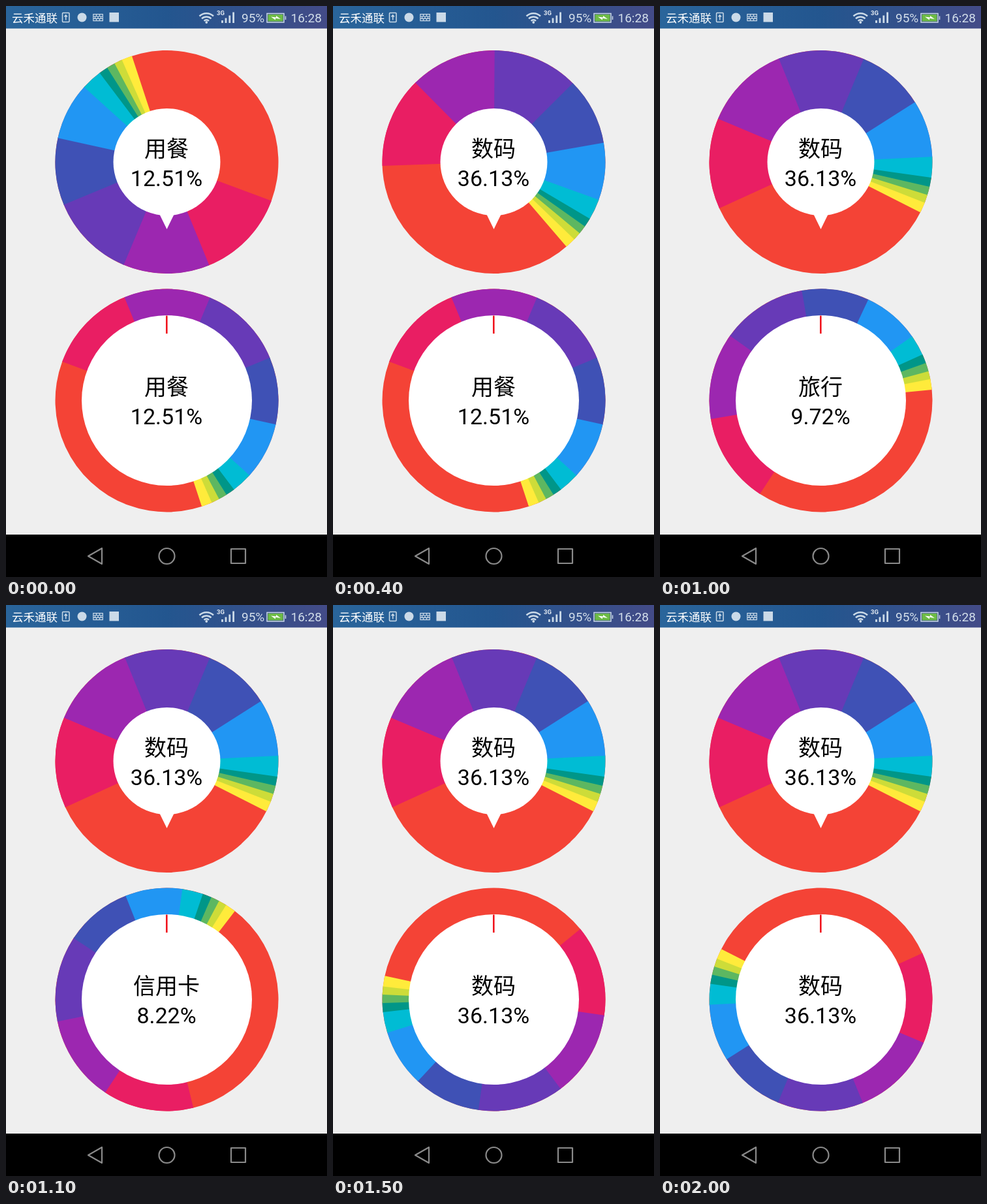
An HTML page for the animation above (2.4 s loop, 492 px wide and 875 px high).

```html
<!DOCTYPE html>
<html lang="zh-CN">
<head>
<meta charset="utf-8">
<title>Pie charts</title>
<style>
  html, body { margin: 0; height: 100%; overflow: hidden; background: #efefef; }
  svg { display: block; width: 100%; height: 100%; }
  text { font-family: Roboto, "Noto Sans CJK SC", "Noto Sans CJK", sans-serif; }
  .label { font-size: 34px; text-anchor: middle; fill: #000; }
  .status { font-size: 19px; fill: #d3dfeb; }
  .line { fill: none; stroke: #cbdae8; stroke-width: 1.5; }
  .nav { fill: none; stroke: #8a8a8a; stroke-width: 2.2; stroke-linejoin: round; }
</style>
</head>
<body>
<svg viewBox="0 0 492 875">
  <defs>
    <linearGradient id="bar">
      <stop offset="0" stop-color="#2a659b"/>
      <stop offset=".5" stop-color="#23568f"/>
      <stop offset="1" stop-color="#434b87"/>
    </linearGradient>
  </defs>
  <rect width="492" height="875" fill="#efefef"/>

  <!-- status bar -->
  <rect width="492" height="34.5" fill="url(#bar)"/>
  <text x="9" y="24.5" font-size="17.5" font-weight="500" fill="#fff">云禾通联</text>
  <g class="line">
    <rect x="86.5" y="10.5" width="10.5" height="14" rx="1"/>
    <path d="M91.7 21.5v-7M89.5 16.5l2.2-2.5 2.2 2.5"/>
    <path d="M133.8 12.7h14.5v10h-14.5zM134 16h14M134 19.3h14M138.5 13v3M143.5 13v3M141 16v3.3M136.5 16v3M145.5 16v3M138.5 19.5v3M143.5 19.5v3" stroke-width="1.2"/>
    <path d="M296.5 15.5a15.5 15.5 0 0 1 21.5 0M300 19.3a10.5 10.5 0 0 1 14.5 0M303.6 22.8a5.5 5.5 0 0 1 7.4 0" stroke-width="2.5"/>
    <path d="M331.5 26v-4M337 26v-7.5M342.8 26v-11.5M348.6 26v-16.5" stroke-width="2.8"/>
    <path d="M400 11.5h26v13.5h-26zM428.5 15.5v5.5"/>
  </g>
  <circle cx="116.5" cy="17.5" r="7" fill="#cbdae8"/>
  <rect x="158.5" y="10" width="14.5" height="14.5" fill="#cbdae8"/>
  <circle cx="307.3" cy="25" r="1.9" fill="#cbdae8"/>
  <rect x="401.5" y="13" width="23" height="10.5" fill="#6dbb45"/>
  <path d="M406 16.5l8 1 0-2.5 7 5-8-1.2v2.7z" fill="#fff"/>
  <text x="323" y="13.5" font-size="9.5" font-weight="700" fill="#e6edf4">3G</text>
  <text class="status" x="361" y="25">95%</text>
  <text class="status" x="436.5" y="25">16:28</text>

  <!-- upper chart -->
  <g id="upperWheel"></g>
  <circle cx="246.5" cy="239" r="82" fill="#fff"/>
  <path d="M235.5 319.5h22L246.5 342z" fill="#fff"/>
  <text class="label" id="upperName" x="246" y="231"></text>
  <text class="label" id="upperShare" x="246" y="276"></text>

  <!-- lower chart -->
  <g id="lowerWheel"></g>
  <circle cx="246.5" cy="604.5" r="130.5" fill="#fff"/>
  <path d="M246.3 474.5v27.5" stroke="#f0141e" stroke-width="2.6"/>
  <text class="label" id="lowerName" x="246" y="596"></text>
  <text class="label" id="lowerShare" x="246" y="641"></text>

  <!-- navigation bar -->
  <rect y="810" width="492" height="65" fill="#000"/>
  <g class="nav">
    <path d="M126 843l21-12v24z"/>
    <circle cx="246.5" cy="843" r="12"/>
    <rect x="345" y="832" width="22" height="22"/>
  </g>
</svg>
<script>
const RADIUS = 171, LOOP = 2400, STEP = 100;
const byId = id => document.getElementById(id);

// Slices clockwise, starting where the largest one ends; sweep in degrees.
const slices = [
  ['购物', '13.14%', 47.3, '#e91e63'],
  ['用餐', '12.51%', 45.1, '#9c27b0'],
  ['交通', '12.42%', 44.7, '#673ab7'],
  ['旅行', '9.72%', 35, '#3f51b5'],
  ['信用卡', '8.22%', 29.7, '#2196f3'],
  ['房租', '3.01%', 10.8, '#00bcd4'],
  ['医疗', '1.30%', 4.7, '#009688'],
  ['娱乐', '1.21%', 4.4, '#5db761'],
  ['学习', '1.17%', 4.2, '#cddc39'],
  ['其他', '1.17%', 5.5, '#ffeb3b'],
  ['数码', '36.13%', 128.6, '#f44336'],
].map(([name, share, sweep, color]) => ({ name, share, sweep, color }));

let total = 0;
for (const slice of slices) {
  slice.start = total;
  slice.end = total += slice.sweep;
}

const rim = degrees => {
  const a = degrees * Math.PI / 180;
  return `${RADIUS * Math.cos(a)} ${RADIUS * Math.sin(a)}`;
};

// The largest slice is a full disc below the others; small overlaps hide seams.
const largest = slices[slices.length - 1];
const wheelMarkup = `<circle r="${RADIUS}" fill="${largest.color}"/>` +
  slices.slice(0, -1).map(({ start, end, color }, i) => {
    const overlap = i < slices.length - 2 ? 0.4 : 0;
    return `<path fill="${color}" d="M0 0L${rim(start)}A${RADIUS} ${RADIUS} 0 0 1 ${rim(end + overlap)}Z"/>`;
  }).join('');

const ease = p => (1 - Math.cos(Math.PI * Math.min(1, p))) / 2;

// A fling slows down to its peak angle, then the wheel snaps to a slice centre.
function spin(k, { peak, peakAt, friction, rest, restAt }) {
  return k < peakAt
    ? peak + friction * (peakAt - k) ** 2
    : peak + (rest - peak) * ease((k - peakAt) / (restAt - peakAt));
}

const upperSpin = { peak: 178.8, peakAt: 4.3, friction: -8.9, rest: 155.5, restAt: 6 };
const lowerSpin = { peak: -53.6, peakAt: 17, friction: 3.606, rest: -24.5, restAt: 20 };

const upperAngle = k => Math.max(20.35, spin(k, upperSpin));
const lowerAngle = k => {
  const dragged = 200.35 - 4.75 * Math.max(0, k - 7);
  return Math.min(dragged, spin(k, lowerSpin));
};

function drawChart(id, centerY, angle, pointer) {
  byId(id + 'Wheel').setAttribute('transform', `translate(246.5 ${centerY}) rotate(${angle})`);
  const under = ((pointer - angle) % 360 + 360) % 360;
  const slice = slices.find(s => under < s.end) || largest;
  byId(id + 'Name').textContent = slice.name;
  byId(id + 'Share').textContent = slice.share;
}

byId('upperWheel').innerHTML = byId('lowerWheel').innerHTML = wheelMarkup;

const startTime = performance.now();
function frame() {
  const time = Math.max(0, performance.now() - startTime) % LOOP;
  const k = Math.floor(time / STEP);
  drawChart('upper', 239, upperAngle(k), 90);
  drawChart('lower', 604.5, lowerAngle(k), 270);
  requestAnimationFrame(frame);
}
frame();
</script>
</body>
</html>
```
